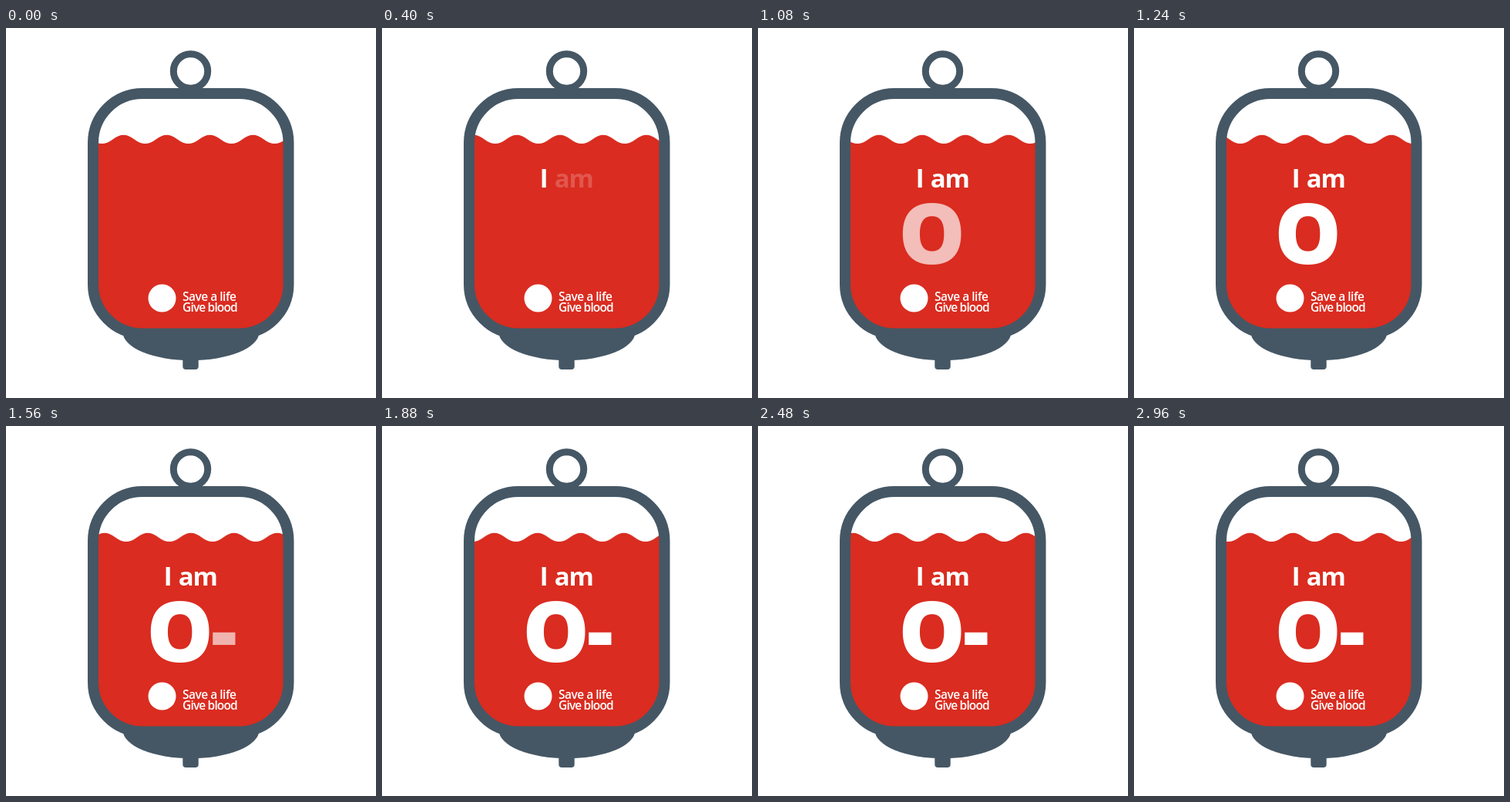
Animation, 480 px wide and 480 px high, one loop 3000 ms. Source, as an HTML page:

```html
<!DOCTYPE html>
<html lang="en">
<head>
<meta charset="utf-8">
<title>Blood bag</title>
<style>
  html, body { margin: 0; width: 100%; height: 100%; overflow: hidden; background: #fff; }
  svg { display: block; width: 100vw; height: 100vh; }
  text { font-family: "Open Sans", "Noto Sans", sans-serif; font-weight: 600; fill: #fff; }
  .slate { fill: #455765; }
  .outline { fill: none; stroke: #455765; }
  .wave { fill: #da2c20; animation: drift 1s steps(25) infinite; }
  .lead { font-size: 34px; font-weight: 700; }
  .close { font-size: 33px; letter-spacing: -1.2px; }
  .group { font-weight: 800; font-size: 109px; text-anchor: middle; }
  .sign { font-size: 106px; }
  .tag { font-size: 15.5px; letter-spacing: -0.5px; }
  .tight { letter-spacing: -0.85px; }

  .i, .am, .o, .minus { animation: 3s linear infinite; }
  .i { animation-name: show-i; }
  .am { animation-name: show-am; }
  .o { animation-name: show-o; }
  .minus { animation-name: show-minus; }

  /* one wavelength per second */
  @keyframes drift { to { transform: translateX(56px); } }
  @keyframes show-i { 0% { opacity: 0; } 11.1%, 100% { opacity: 1; } }
  @keyframes show-am { 0%, 11.1% { opacity: 0; } 22.2%, 100% { opacity: 1; } }
  @keyframes show-o { 0%, 28.4% { opacity: 0; } 39.5%, 100% { opacity: 1; } }
  @keyframes show-minus { 0%, 45% { opacity: 0; } 56%, 100% { opacity: 1; } }
</style>
</head>
<body>
<svg viewBox="0 0 480 480">
  <defs>
    <clipPath id="bag"><rect x="113" y="85" width="253.5" height="311.5" rx="64"/></clipPath>
  </defs>

  <circle class="outline" cx="239.5" cy="56" r="22.2" stroke-width="9"/>
  <path class="slate" d="M151.5 394.5A88.5 36.7 0 0 0 328.5 394.5Z"/>
  <rect class="slate" x="229.3" y="420" width="20.4" height="23" rx="4"/>

  <g clip-path="url(#bag)">
    <path class="wave" d="M26.5 144.4
      c10.2 -7.5 17.8 -7.5 28 0 s17.8 7.5 28 0 s17.8 -7.5 28 0 s17.8 7.5 28 0
      s17.8 -7.5 28 0 s17.8 7.5 28 0 s17.8 -7.5 28 0 s17.8 7.5 28 0
      s17.8 -7.5 28 0 s17.8 7.5 28 0 s17.8 -7.5 28 0 s17.8 7.5 28 0
      s17.8 -7.5 28 0 s17.8 7.5 28 0 V410 H26.5Z"/>
  </g>
  <rect class="outline" x="113" y="85" width="253.5" height="311.5" rx="64" stroke-width="14"/>

  <text class="lead i" x="204.5" y="206.5">I</text>
  <text class="lead close am" x="223.7" y="206.5">am</text>
  <text class="group o" x="225.7" y="305.8">O</text>
  <text class="group sign minus" x="282.8" y="304">-</text>

  <circle cx="202.5" cy="350.5" r="18" fill="#fff"/>
  <text class="tag" x="229" y="354">Save a life</text>
  <text class="tag tight" x="229" y="368">Give blood</text>
</svg>
</body>
</html>
```
